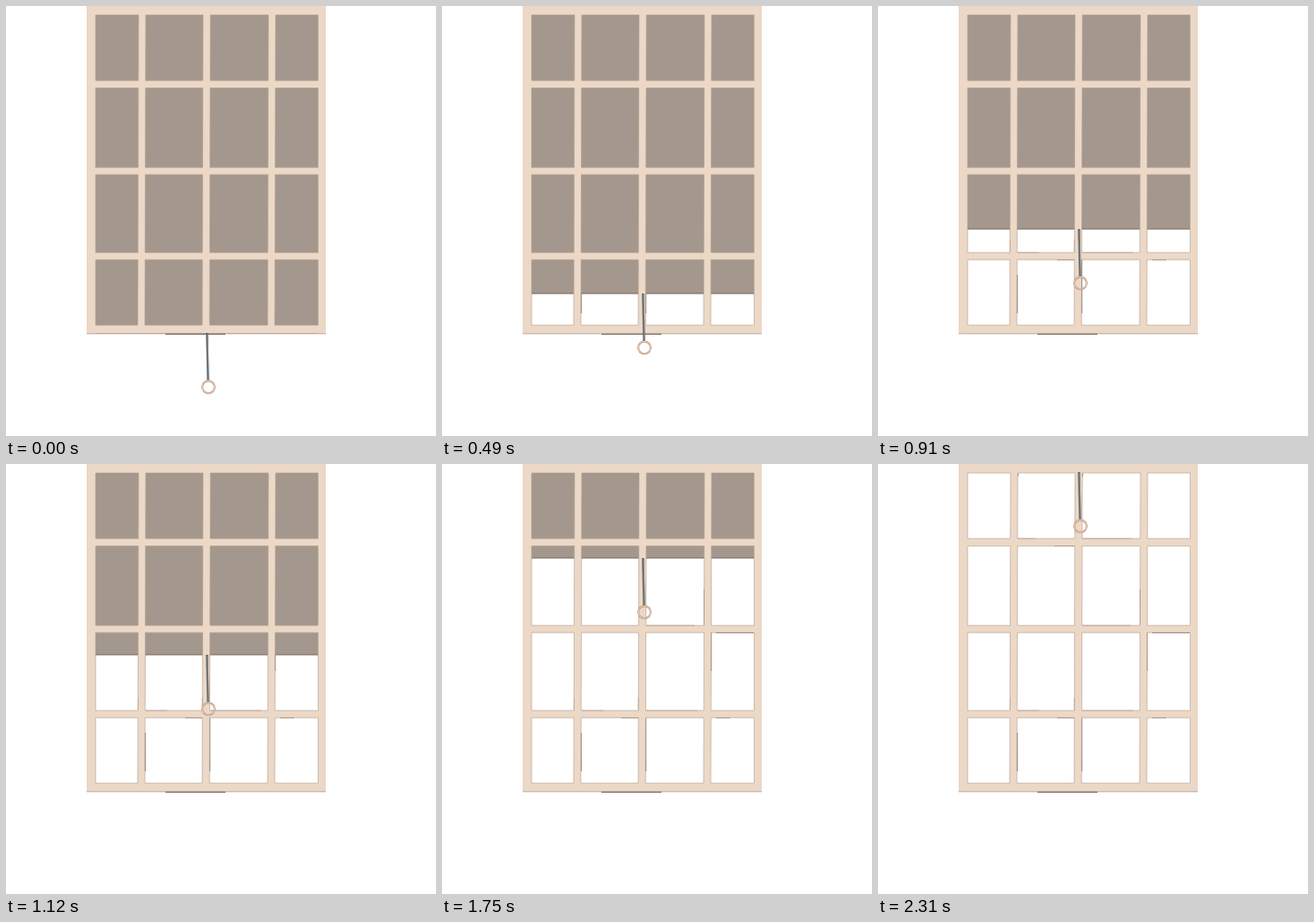
These frames come from a looping animation (480 by 480 pixels, 3.08 s). An HTML page:

```html
<!DOCTYPE html>
<html lang="en">
<head>
<meta charset="utf-8">
<title>Window blind</title>
<style>
  html, body { margin: 0; height: 100%; overflow: hidden; background: #fff; }
  svg { display: block; width: 100%; height: 100%; }
  path, circle { fill: none; }
  #frame { fill: #ecd8c6; fill-rule: evenodd; }
  #edges { stroke: #b09a88; stroke-width: .6; }
  #shadows { stroke: #5d4c41; stroke-width: .9; }
</style>
</head>
<body>
<svg viewBox="0 0 480 480">
  <path id="shadows" d="M147.6 261V275M219.4 261V275M155.3 300V343M227.6 283V343M300.5 188V231M292.7 140V180
    M156 10V14M228.3 10V14M156 83.4H176M228 83.4H283M197 91.5H220M228 180.4H282M156 275.4H180M228 275.4H285
    M200 283.2H220M306 283.2H322M306 188.4H348"/>
  <g id="blind">
    <rect x="100" y="-380" width="248.5" height="380" fill="#a4988e"/>
    <path d="M100 0H348.5" stroke="#6b6058" stroke-width=".9"/>
  </g>
  <path id="frame"/>
  <path id="edges"/>
  <path d="M90 365.8H357" stroke="#a08a7a" stroke-width=".7"/>
  <path d="M178 366.3H245" stroke="#5d4c41" stroke-width=".9"/>
  <g id="pull">
    <path d="M224.4 0L225.6 53" stroke="#596064" stroke-width="2.4"/>
    <path d="M225 1L226 52" stroke="#8d9497" stroke-width="1"/>
    <circle cx="226" cy="60.3" r="6.9" stroke="#b58a6f" stroke-width="2"/>
    <circle cx="226" cy="60.3" r="6.9" stroke="#f0dbc9" stroke-width="1"/>
  </g>
</svg>
<script>
  const STEP = 70, LOOP = 3080;
  const $ = id => document.getElementById(id);

  // Panes lean slightly to the left towards the bottom.
  const columns = [[100, 148], [156, 220], [228.2, 293], [301, 348.5]];
  const rows = [[10, 83.2], [91.6, 180.2], [188.2, 275.2], [283.2, 356.2]];
  const lean = (x, y) => x > 100 && x < 348 ? x - y / 366 : x;
  const panes = rows.flatMap(([top, bottom]) => columns.map(([left, right]) =>
    `M${lean(left, top)} ${top}L${lean(right, top)} ${top}` +
    `L${lean(right, bottom)} ${bottom}L${lean(left, bottom)} ${bottom}Z`)).join("");
  $("frame").setAttribute("d", "M90 0H357V365.6H90Z" + panes);
  $("edges").setAttribute("d", panes);

  // A short tug down, then a steady rise to the top.
  function blindBottom(step) {
    if (step === 0) return 365;
    if (step < 3) return 374;
    return Math.max(8.5, 405 - 12 * step);
  }

  function draw(now) {
    const y = blindBottom(Math.floor(now % LOOP / STEP));
    for (const id of ["blind", "pull"]) $(id).setAttribute("transform", `translate(0 ${y})`);
    requestAnimationFrame(draw);
  }
  draw(performance.now());
</script>
</body>
</html>
```
